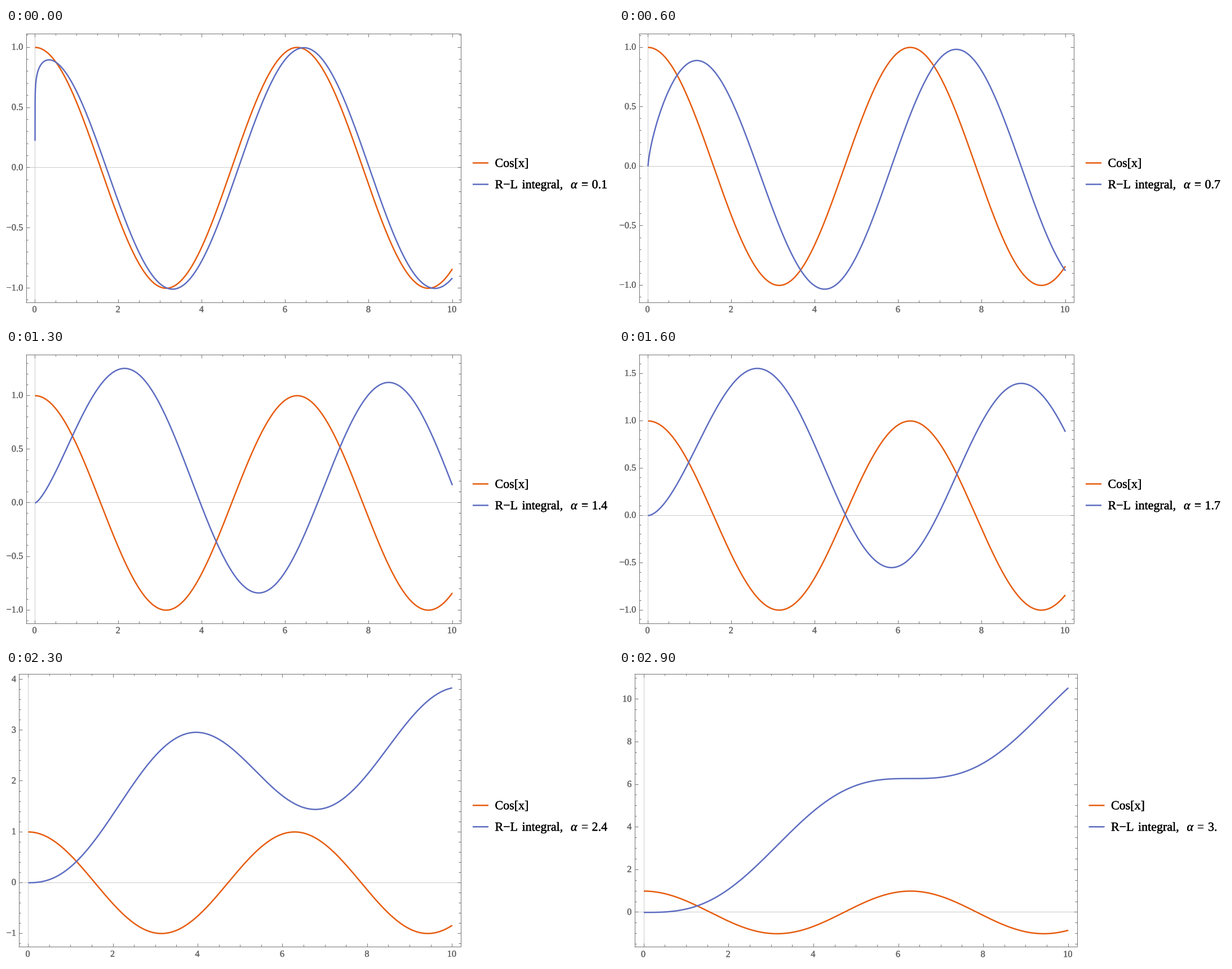
These frames come from a looping animation (1077 px wide and 520 px high, 3000 ms). A matplotlib script:

```python
import math

import matplotlib.pyplot as plt
import numpy as np
from matplotlib.animation import FuncAnimation
from matplotlib.collections import LineCollection
from matplotlib.patheffects import withStroke

W, H, DPI = 1077, 520, 100
PX = 72 / DPI
FRAMES = 30
ORANGE = (0.9, 0.36, 0.054)
BLUE = (0.365, 0.428, 0.758)
GRAY, PALE, LABEL = "#747474", "#cbcbcb", "#666666"
TICK_EM, LEGEND_EM = 16.4, 22
GOLDEN = (1 + math.sqrt(5)) / 2
CHAR_EM = {"−": 0.564, ".": 0.25}

X = np.concatenate([np.geomspace(2e-7, 0.1, 80), np.linspace(0.1, 10, 400)[1:]])

plt.rcParams["font.family"] = "Liberation Serif"
plt.rcParams["text.hinting"] = "none"
fig = plt.figure(figsize=(W / DPI, H / DPI), dpi=DPI, facecolor="white")
ax = fig.add_axes([0, 0, 1, 1])


def integral_of_cos(a):
    """Riemann-Liouville integral of cos, order a, as a power series."""
    return sum((-1) ** k * X ** (2 * k + a) / math.gamma(2 * k + a + 1)
               for k in range(30))


def tick_steps(span):
    """Major and minor spacing for a value axis."""
    for major, minor in ((0.5, 0.1), (1, 0.2), (2, 0.5)):
        if span / major < 7.8:
            break
    return major, minor


def multiples(step, lo, hi):
    return [k * step for k in range(math.ceil(lo / step), math.floor(hi / step) + 1)]


def is_major(v, step):
    return abs(v / step - round(v / step)) < 1e-6


def label_of(v, step):
    s = f"{v:.1f}" if step < 1 else f"{v:.0f}"
    return s.replace("-", "−")


def label_width(s):
    return TICK_EM * sum(CHAR_EM.get(c, 0.5) for c in s)


def snap(v):
    return math.floor(v) + 0.5


def segments(segs, color, z):
    ax.add_collection(LineCollection(segs, colors=[color], linewidths=PX, zorder=z),
                      autolim=False)


def write(x, y, s, em=LEGEND_EM, color="black", ha="left", **kw):
    # A hairline stroke gives the slightly heavy look of smoothed type.
    ax.text(x, y, s, fontsize=em * PX, color=color, ha=ha, va="baseline",
            path_effects=[withStroke(linewidth=0.25, foreground=color)], **kw)


def curve(x, y, color, z=2):
    ax.plot(x, y, color=color, lw=2.5 * PX, solid_capstyle="butt",
            solid_joinstyle="round", snap=False, zorder=z)


def legend(shift, y, value):
    for row, color in ((y, ORANGE), (y + 38, BLUE)):
        curve([828 + shift, 856 + shift], [row, row], color)
    base = y + 7
    write(867.5 + shift, base, "Cos[x]")
    base += 38
    write(867.5 + shift, base, "R−L")
    write(915.5 + shift, base, "integral,")
    write(1002 + shift, base, "α", style="italic")
    write(1020.5 + shift, base, "=")
    write(1039.5 + shift, base, value)


def draw(i):
    ax.cla()
    ax.set_xlim(0, W)
    ax.set_ylim(H, 0)
    ax.axis("off")

    a = (i + 1) / 10
    value = f"{a:.1f}"
    if value.endswith("0"):
        value = value[:-1]
    shift = 5.5 if value.endswith(".") else 0

    # Value range: the padding is 5% of the padded range on each side.
    cos, blue = np.cos(X), integral_of_cos(a)
    lo, hi = min(cos.min(), blue.min()), max(cos.max(), blue.max())
    pad = (hi - lo) / 18
    lo, hi = lo - pad, hi + pad
    major, minor = tick_steps(hi - lo)
    y_major = multiples(major, lo, hi)
    y_labels = [label_of(v, major) for v in y_major]

    # Frame: room for the widest label on the left, golden aspect ratio.
    left = 5.45 + max(map(label_width, y_labels)) + shift
    right = 806.5 + shift
    width = right - left
    height = width / GOLDEN
    middle = 200 + height / 10
    gap = (hi - y_major[-1]) / (hi - lo) * height
    top = middle - height / 2 + max(0, 5 - gap) / 2
    bottom = top + height

    def px(x):
        return left + width * (0.02 + 0.096 * x)

    def py(y):
        return bottom - height * (y - lo) / (hi - lo)

    x0, x1, y0, y1 = map(snap, (left, right, top, bottom))
    zx, zy = snap(px(0)), snap(py(0))
    segments([[(x0, zy), (x1, zy)], [(zx, y0), (zx, y1)]], PALE, 1)

    curve(px(X) + 0.9, py(cos) + 1.3, ORANGE, 2)
    curve(px(X) + 0.9, py(blue) + 1.3, BLUE, 3)

    lines = [[(x0 - .5, y0), (x1 + .5, y0)], [(x0 - .5, y1), (x1 + .5, y1)],
             [(x0, y0), (x0, y1)], [(x1, y0), (x1, y1)]]
    for v in multiples(0.5, -0.2, 10.2):
        x, n = snap(px(v)), 6 if is_major(v, 2) else 3.5
        lines += [[(x, y0), (x, y0 + n)], [(x, y1), (x, y1 - n)]]
    for v in multiples(minor, lo, hi):
        y, n = snap(py(v)), 6 if is_major(v, major) else 3.5
        lines += [[(x0, y), (x0 + n, y)], [(x1, y), (x1 - n, y)]]
    segments(lines, GRAY, 4)

    for v in range(0, 11, 2):
        write(px(v), bottom + 18.3, str(v), TICK_EM, LABEL, "center")
    for v, s in zip(y_major, y_labels):
        write(left - 4.9, py(v) + 5.4, s, TICK_EM, LABEL, "right")

    legend(shift, middle - 8.2, value)
    return []


anim = FuncAnimation(fig, draw, frames=FRAMES, init_func=lambda: [],
                     interval=100, repeat=True, repeat_delay=0)
plt.show()
```
